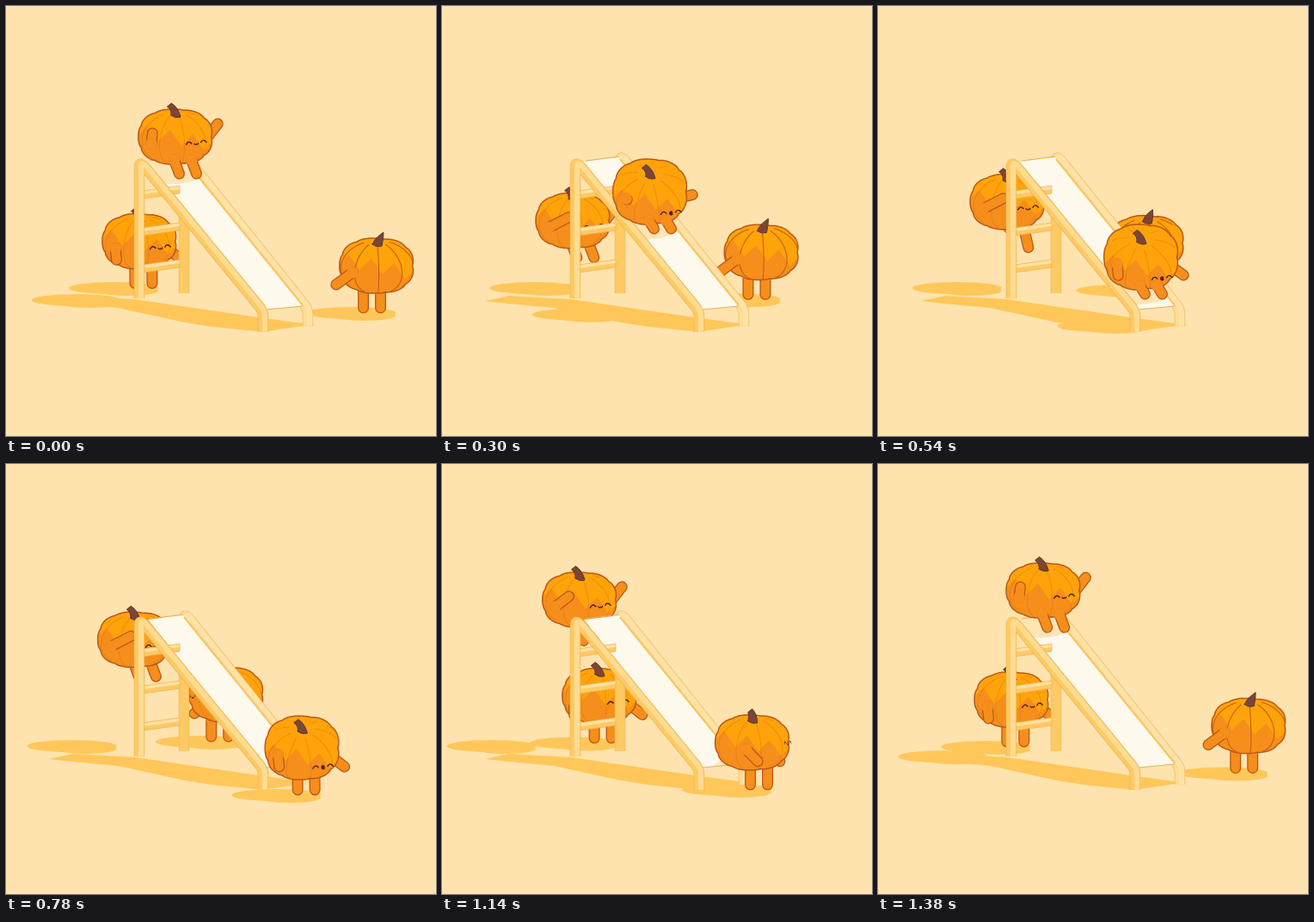
An HTML page with a canvas that plays this animation: 500x500 px, repeating every 1410 ms.

```html
<!DOCTYPE html>
<html>
<head>
<meta charset="utf-8">
<style>
html, body { margin: 0; height: 100%; overflow: hidden; background: #ffe3ae; }
canvas { display: block; width: 100vw; height: 100vh; }
</style>
</head>
<body>
<canvas id="stage" width="500" height="500"></canvas>
<script>
const ctx = document.getElementById('stage').getContext('2d');
const { sin, cos, abs, sign, hypot, sqrt, floor, PI } = Math;
const LOOP = 1410, CIRCUIT = 3 * LOOP, TAU = PI * 2;
const LIGHT = '#ffa30a', SHADE = '#f68e1b', LINE = '#b9581a', DARK = '#4a2016';
const GROUND = '#ffe3ae', SHADOW = '#ffc75a', WOOD = '#ffc963', WOOD_LIT = '#ffdc92', EDGE = '#e5b255';

// Every pumpkin follows this closed circuit: down the slide, round the back, up the ladder.
const PATH = [ // time, x, y
  [0, 197, 152], [300, 242, 216], [540, 306, 292], [760, 343, 329], [1080, 350, 325],
  [1260, 394, 319], [1410, 431, 302], [2190, 256, 268], [2670, 163, 271], [2850, 155, 272],
  [3840, 152, 179], [4080, 174, 139]
];

function ease(t, from, to) {
  const u = Math.min(1, Math.max(0, (t - from) / (to - from)));
  return u * u * (3 - 2 * u);
}
function during(t, from, to, ramp) {
  return ease(t, from, from + ramp) - ease(t, to, to + ramp);
}

// Smooth spline through the closed circuit.
function place(t) {
  const n = PATH.length;
  const point = j => {
    const lap = floor(j / n), [time, x, y] = PATH[j - lap * n];
    return [time + lap * CIRCUIT, x, y];
  };
  let i = 0;
  while (point(i + 1)[0] <= t) i++;
  const [a, b, c, d] = [-1, 0, 1, 2].map(o => point(i + o));
  const h = c[0] - b[0], u = (t - b[0]) / h;
  return [1, 2].map(k => {
    const m0 = h * (c[k] - a[k]) / (c[0] - a[0]);
    const m1 = h * (d[k] - b[k]) / (d[0] - b[0]);
    const gap = c[k] - b[k];
    return b[k] + u * (m0 + u * (3 * gap - 2 * m0 - m1 + u * (m0 + m1 - 2 * gap)));
  });
}

function fill(path, color) { ctx.fillStyle = color; ctx.fill(path); }
function stroke(path, color, width) {
  ctx.strokeStyle = color;
  ctx.lineWidth = width;
  ctx.stroke(path);
}
function polygon(points) { return new Path2D('M' + points.join('L') + 'Z'); }
function oval(x, y, rx, ry) {
  const path = new Path2D();
  path.ellipse(x, y, rx, ry, 0, 0, TAU);
  return path;
}

function limb(x0, y0, x1, y1) {
  const path = new Path2D(`M${x0} ${y0}L${x1} ${y1}`);
  ctx.lineCap = 'round';
  stroke(path, LINE, 13);
  stroke(path, SHADE, 10.4);
  fill(oval(x0, y0, 6.7, 6.7), SHADE); // opens the joint
}

function bodyOutline(ry) {
  const points = [];
  for (let a = 0; a < TAU; a += .05) {
    const lobe = .965 + .04 * sqrt(abs(sin(4.5 * a)));
    const bulge = v => sign(v) * abs(v) ** .84 * lobe;
    points.push([43 * bulge(cos(a)), ry * bulge(sin(a))]);
  }
  return polygon(points);
}

function shadeArea(drop) {
  const points = [[46, 60], [-46, 60]];
  for (let i = 0; i < 8; i++) {
    const x = -46 + 13.2 * i;
    points.push([x, 1 + .2 * x + (i % 2 ? -8 : 8) + drop]);
  }
  return polygon(points);
}

function face(x, y, yaw, open) {
  ctx.save();
  ctx.translate(x, y);
  ctx.rotate(-.12);
  ctx.scale(Math.max(.3, cos(yaw) * 1.2), 1);
  ctx.lineCap = 'round';
  stroke(new Path2D('M-12 1Q-8.5 -4 -5.5 .5M5.5 .5Q8.5 -4 12 1'), DARK, 1.4);
  if (open) fill(oval(0, 1, 2.2, 2.6), DARK);
  else stroke(new Path2D('M-2.5 1Q-1 3.5 0 1.5Q1 3.5 2.5 1'), DARK, 1.2);
  ctx.restore();
}

function stem(base, lean) {
  const tip = base - 14;
  const path = new Path2D(`M-5 ${base}Q${lean * .2 - 3} ${base - 7} ${lean - 3} ${tip + 4}` +
    `L${lean + 2} ${tip}Q${lean * .4 + 6} ${base - 9} 6 ${base + 2}Q0 ${base + 4} -5 ${base}Z`);
  fill(path, '#7a4636');
  stroke(path, '#653427', 1);
}

function pumpkin(t) {
  const air = 1 - during(t, 600, 2800, 200);
  const climb = during(t, 2850, 3900, 150);
  const lift = 1 - ease(t, 0, 600) + ease(t, 2800, 3100);
  const pitch = .28 + .55 * during(t, 0, 720, 240);
  const yaw = .6 + 3.3 * ease(t, 1040, 1380) + (TAU - 3.3) * ease(t, 1850, 2620);
  const sp = sin(pitch), cp = cos(pitch), side = cos(yaw), front = sin(yaw);
  const ry = hypot(31 * cp, 43 * sp);
  const project = (lon, lat) => {
    const px = 43 * sin(lon) * cos(lat), up = 31 * sin(lat), pz = 43 * cos(lon) * cos(lat);
    return [px, pz * sp - up * cp, pz * cp + up * sp];
  };
  const arm = s => limb(s * 36 * side + 3 * front, 8,
    s * 46 * side + 20 * front + (s < 0 ? 22 * climb : 0), 22 - lift * (s < 0 ? 26 : 37));
  const nearArm = front > 0 ? -1 : 1;
  const legs = () => [-10, 10].forEach(s => {
    const x = 8 * front + 10 * air + s;
    const step = s * climb * cos(TAU * (t - 3360) / 960);
    limb(x - 6 * air, ry - 5, x, 49 - 6 * air + step);
  });
  const legsInFront = air > .5 && climb < .5;

  ctx.save();
  ctx.translate(...place(t));
  if (!legsInFront) legs();
  arm(-nearArm);

  const body = bodyOutline(ry);
  fill(body, LIGHT);
  ctx.save();
  ctx.clip(body);
  fill(shadeArea(20 * (pitch - .28)), SHADE);
  const ribs = new Path2D();
  for (let k = 0; k < 9; k++) {
    let drawing = false;
    for (let lat = 1.2; lat > -1; lat -= .1) {
      const [px, py, pz] = project(yaw + (k + .5) * TAU / 9, lat);
      if (pz > 5) drawing ? ribs.lineTo(px, py) : ribs.moveTo(px, py);
      drawing = pz > 5;
    }
  }
  stroke(ribs, side < 0 ? '#c2610f' : 'rgba(214, 110, 10, .4)', 1.1);
  ctx.restore();
  stroke(body, LINE, 1.5);
  stem(-26 * cp, -8 * side);

  const [fx, fy, fz] = project(yaw, .1);
  if (legsInFront) legs();
  if (fz > 8) face(fx, fy, yaw, pitch > .5);
  arm(nearArm);
  ctx.restore();
}

function groundShadow(t) {
  const [x, y] = place(t), feet = y + 55;
  const s = t > 3400 ? t - CIRCUIT : t; // time before or after the top
  const above = s < 700 || s > 2800;
  const progress = s > 2800 ? 0 : Math.max(0, (s + 250) / 950);
  const ground = above ? 328 + 53 * progress : feet;
  const cx = x - 30 - .63 * Math.max(0, ground - feet);
  fill(oval(cx, ground, 52, 7), SHADOW);
  fill(oval(cx + 16, ground + 3, 36, 6), SHADOW);
}

const deck = polygon([[165, 181], [206, 176], [345, 349], [303, 353]]);
const nearRail = new Path2D('M155 340V190Q154 178 163 189L295 350Q299 355 299 361V379');
const farPost = new Path2D('M207 334V182');
const farRail = new Path2D('M207 182Q207 172 214 181L346 346Q351 352 351 358V373');
const slideShadow = polygon([[50, 343], [78, 337], [150, 341], [300, 363], [345, 369],
  [345, 372], [298, 379], [240, 373], [208, 368], [130, 351], [76, 346]]);

function rail(path, base, lit) {
  ctx.lineCap = 'butt';
  ctx.lineJoin = 'round';
  stroke(path, EDGE, 12.4);
  stroke(path, base, 11.4);
  ctx.save();
  ctx.translate(2, -.5);
  stroke(path, lit, 6);
  ctx.restore();
}

function slide(riders) {
  rail(farPost, WOOD, WOOD);
  rail(farRail, '#ffdc94', '#ffe2a8');
  fill(deck, '#fdf9ed');
  ctx.save();
  ctx.clip(deck);
  for (const t of riders) {
    const [x, y] = place(t);
    fill(oval(x - 5, y + 35, 44, 20), '#ffe5b4');
  }
  ctx.restore();
  stroke(new Path2D('M207 178L345 348'), '#f9c461', 2);
  stroke(new Path2D('M303 353L345 349M167 180L206 175'), EDGE, 1);
  for (const y of [215, 258, 301]) {
    const band = h => polygon([[159, y], [202, y - 6], [202, y - 6 + h], [159, y + h]]);
    fill(band(9), WOOD);
    fill(band(4), '#ffe2a2');
    stroke(band(9), EDGE, .7);
  }
  rail(nearRail, WOOD, WOOD_LIT);
}

function draw() {
  const now = floor(performance.now() % LOOP / 30) * 30;
  const times = [now + LOOP, now + 2 * LOOP, now];
  const onSlide = t => t < 1320 || t > 3980;
  ctx.fillStyle = GROUND;
  ctx.fillRect(0, 0, 500, 500);
  fill(slideShadow, SHADOW);
  times.forEach(groundShadow);
  times.filter(t => !onSlide(t)).forEach(pumpkin);
  slide(times.filter(onSlide));
  times.filter(onSlide).forEach(pumpkin);
  requestAnimationFrame(draw);
}
draw();
</script>
</body>
</html>
```
